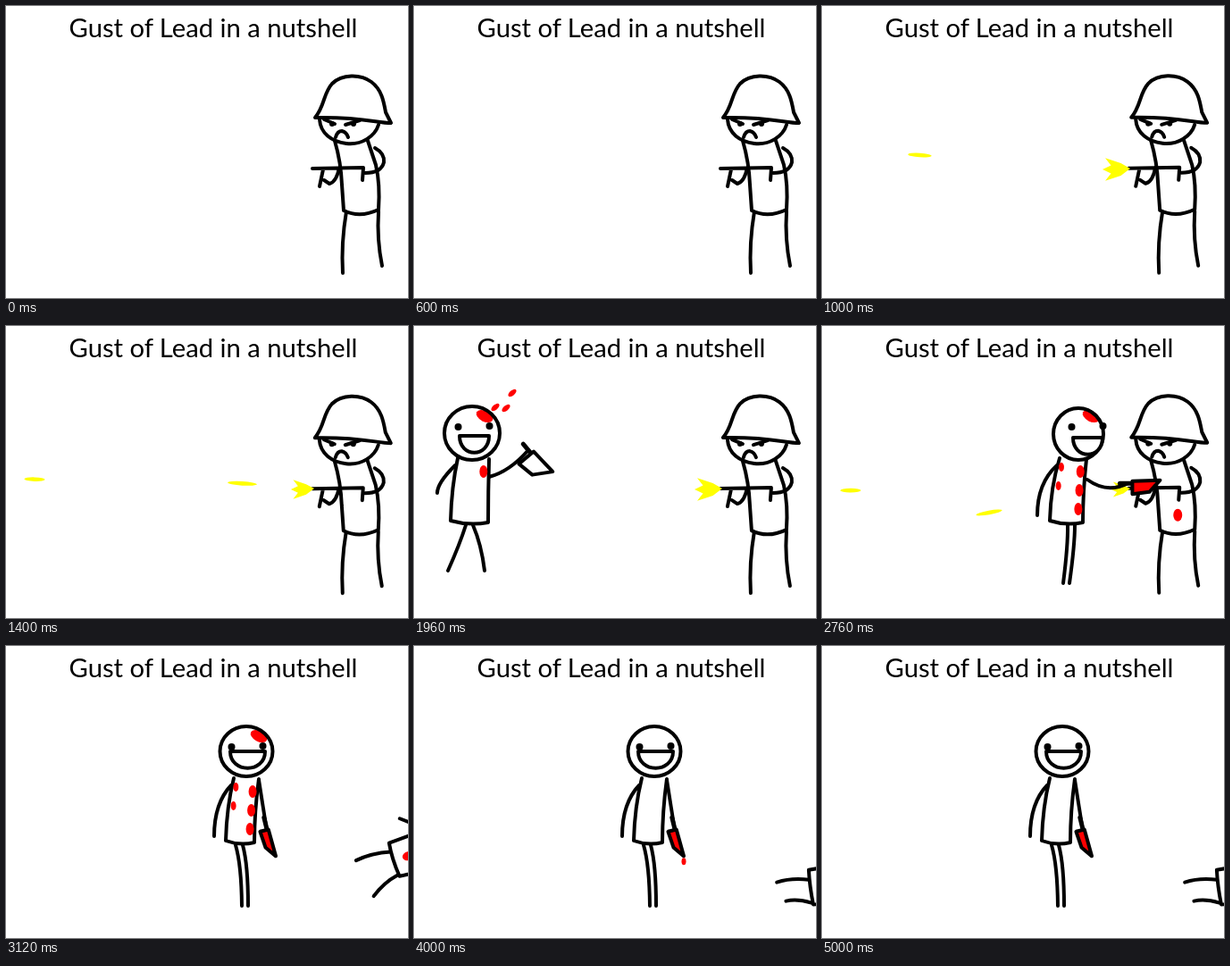
An HTML page with a canvas for the animation above (5040 ms loop, 450 px wide and 327 px high).

```html
<!DOCTYPE html>
<html lang="en">
<head>
<meta charset="utf-8">
<title>Stick soldier</title>
<style>
  html, body { margin: 0; width: 100%; height: 100%; overflow: hidden; background: #fff; }
  canvas { display: block; }
  h1 { position: absolute; left: 14px; right: 0; top: 5px; margin: 0; text-align: center;
       font: 400 29.2px/38px Lato, sans-serif; color: #000; white-space: nowrap; }
</style>
</head>
<body>
<canvas id="stage" width="450" height="327"></canvas>
<h1>Gust of Lead in a nutshell</h1>
<script>
const ctx = document.getElementById('stage').getContext('2d');
const LOOP = 5040, STEP = 40;
const RED = '#f00', YELLOW = '#ff0';
const ENTER = 1680, STAB = 2680, FALL = 2840;

// x values are relative to the head; torso lists its corners' x from top left to top right
const charge = {
  head: [31, 30, 120], mouth: [-14, 19, 123], torso: [-16, -24, 18, 19],
  fist: [-39, 187], shoulder: [19, 169], elbow: [42, 163], hand: [63, 139], knife: [50, 1.8],
  hip: [-3], feet: [-6.5, 274], stride: [17]
};
const reach = {
  head: [28, 29, 121], mouth: [-6, 27, 125], torso: [-21, -32, 5, 9],
  fist: [-46, 212], shoulder: [10, 172], elbow: [32, 188], hand: [42, 153], knife: [0, 1.2],
  hip: [-8], feet: [-13.5, 288], stride: [26]
};
const stand = {
  head: [29.5, 28, 118], mouth: [-18, 21, 118], torso: [-14, -23, 9, 14],
  fist: [-36, 213], shoulder: [14, 150], elbow: [18, 176], hand: [22, 201], knife: [76, .8],
  hip: [-8], feet: [-1.5, 291], stride: [0]
};

const bursts = [
  { from: 760, to: 1720, every: 120, slopes: [-.03, -.06] },
  { from: 1960, to: 2680, every: 80, slopes: [.01, .18] }
];

const ramp = (t, from, to) => Math.max(0, Math.min(1, (t - from) / (to - from)));
const lerp = (a, b, p) => a + (b - a) * p;

function mix(a, b, p) {
  const pose = {};
  for (const part in a) pose[part] = a[part].map((v, i) => lerp(v, b[part][i], p));
  return pose;
}

function line(d, width = 4, fill) {
  const path = new Path2D(d);
  if (fill) { ctx.fillStyle = fill; ctx.fill(path); }
  ctx.lineWidth = width;
  ctx.stroke(path);
}

function oval(x, y, rx, ry, fill, tilt = 0) {
  ctx.beginPath();
  ctx.ellipse(x, y, rx, ry, tilt, 0, Math.PI * 2);
  ctx.fillStyle = fill;
  ctx.fill();
}

function placed(x, y, degrees, draw) {
  ctx.save();
  ctx.translate(x, y);
  ctx.rotate(degrees * Math.PI / 180);
  draw();
  ctx.restore();
}

function drawSoldier(t) {
  const p = ramp(t, FALL, 3200), turn = Math.sqrt(p);
  placed(398 + 43 * p, 232 + 39 * p ** 6, 84 * turn, () => {
    const leg = (hipX, footX, footY) =>
      line(`M${hipX} -2Q${(hipX + footX) / 2 - 4} ${footY / 2} ${footX} ${footY}`);
    leg(lerp(-17, -9, turn), lerp(-21, -10, turn), lerp(67, 34, turn));
    leg(lerp(19, 17, turn), lerp(23, 12, turn) + 30 * Math.sin(Math.PI * p), lerp(59, 26, turn));

    ctx.translate(-398, -232);
    const belly = lerp(238, 230, turn);
    line(`M368 151Q375 175 376 200L378 229Q396 ${belly} 417 228Q419 200 414 178L404 148`, 4, '#fff');
    if (t >= STAB) oval(398, 212, 5, 7, RED);
    line('M351 127C352 143 365 152 381 154C398 156 413 146 417 133', 4, '#fff');
    line('M346 125C357 112 355 98 365 87C376 76 397 76 409 85C421 94 423 108 425 119L431 131C415 131 400 124 346 125Z', 4, '#fff');
    line('M356 127L368 132M380 133L396 128');
    oval(365, 132, 3, 3, '#000');
    oval(389, 132, 3, 3, '#000');
    line('M369 147Q371 140 376 140Q381 141 383 147');
    if (p === 0) {
      line('M343 182L400 181L399 195M355 183L351 202M373 181Q370 197 362 199L356 195');
      line('M413 159Q424 165 423 175Q420 187 402 187');
    } else {
      line('M374 185L355 210');
    }
  });
}

function drawFlash(age) {
  ctx.beginPath();
  for (let i = -3; i <= 3; i++) {
    const spike = Math.abs(i) === 3 ? 11 : i % 2 ? 20 : 29;
    const r = spike * (1 - .17 * age);
    ctx.lineTo(343 - r * Math.cos(i * .23), 183 + r * Math.sin(i * .23));
  }
  ctx.lineTo(345, 182);
  ctx.fillStyle = YELLOW;
  ctx.fill();
}

function drawShots(t) {
  for (const { from, to, every, slopes } of bursts) {
    for (let i = 0; from + i * every <= to; i++) {
      const age = (t - from - i * every) / STEP;
      if (age < 0 || age > 4) continue;
      if (age < 3) drawFlash(age);
      const slope = slopes[i % 2], d = 77.5 * age;
      if (age > 0) oval(342 - d, 181 + d * slope, 18 - 1.6 * age, 2.3, YELLOW, -slope);
    }
  }
}

function drawWounds(t, torso) {
  const [topLeft, bottomLeft, bottomRight, topRight] = torso;
  ctx.globalAlpha = 1 - ramp(t, 3400, 3920);
  if (t >= 1840) oval(14, 101, 10, 6, RED, .5);
  for (let i = 0; i < 3; i++) {
    const y = 163 + 21 * i, down = (y - 150) / 70;
    if (t >= 1840 + 200 * i) oval(lerp(topRight, bottomRight, down) - 6, y, 4.5, 7, RED);
    if (i < 2 && t >= 2480 + 120 * i) oval(lerp(topLeft, bottomLeft, down) + 4, y - 5, 3, 5, RED);
  }
  ctx.globalAlpha = 1;

  const spurt = (t - 1840) / 120;
  if (spurt > 0 && spurt < 1.4)
    for (const [dx, dy] of [[8, -12], [20, -11], [27, -28]])
      oval(18 + dx * spurt, 103 + dy * spurt, 5.5, 2.8, RED, -.7);
}

function drawStick(t) {
  if (t < ENTER) return;
  const pose = t < FALL
    ? mix(charge, reach, ramp(t, 1960, 2360))
    : mix(reach, stand, ramp(t, FALL, 3000));
  const { head: [rx, ry, headY], mouth, torso, fist, shoulder, elbow, hand, knife, hip, feet } = pose;
  const x = Math.min(65 + .445 * (t - 1960), 287) - 18 * ramp(t, FALL, 3000);
  const swing = 3.5 + pose.stride[0] * Math.cos((t - 1960) / 294 * Math.PI * 2) * (1 - ramp(t, 2400, 2520));
  const thrust = Math.sin(Math.PI * ramp(t, 2560, FALL)) ** 2;
  const handX = hand[0] + 22 * thrust, handY = hand[1] + 38 * thrust;

  placed(x, 0, 0, () => {
    for (const side of [-1, 1]) {
      const top = hip[0] + 4 * side, foot = feet[0] + swing * side;
      line(`M${top} 223Q${(top + foot) / 2 + 3} 245 ${foot} ${feet[1]}`);
    }
    const [topLeft, bottomLeft, bottomRight, topRight] = torso;
    line(`M${topLeft - 3} 156Q${fist[0]} 176 ${fist[0]} ${fist[1]}`);
    line(`M${topLeft} 148Q${bottomLeft + 1} 180 ${bottomLeft} 218Q${(bottomLeft + bottomRight) / 2} 224 ${bottomRight} 220Q${bottomRight} 185 ${topRight} 149`, 4, '#fff');

    oval(0, headY, rx, ry, '#fff');
    drawWounds(t, torso);
    ctx.beginPath();
    ctx.ellipse(0, headY, rx, ry, 0, 0, Math.PI * 2);
    ctx.lineWidth = 4;
    ctx.stroke();

    const [left, right, lip] = mouth, face = (left + right) / 2;
    oval(face - 18, 113, 4, 4, '#000');
    oval(face + 17, 112, 4, 4, '#000');
    line(`M${left} ${lip}H${right}C${right} ${lip + 25} ${left} ${lip + 25} ${left} ${lip}Z`, 4, '#fff');

    line(`M${shoulder}Q${elbow} ${handX} ${handY}`);
    placed(handX, handY, knife[0], () => {
      line('M-9 0L5 0', 5);
      const w = knife[1];
      line(`M5 ${-2 * w}L36 ${-3 * w}L24 ${8 * w}L5 ${10 * w}Z`, 4, t >= STAB ? RED : '#fff');
    });
  });
}

function drawDrip(t) {
  const fall = ramp(t, 3960, 4240);
  if (fall > 0 && fall < 1) oval(302, 240 + 58 * fall * fall, 2.5, 4, RED);
  if (fall === 1) {
    ctx.globalAlpha = 1 - ramp(t, 4240, 4480);
    oval(308, 299, 6 + 16 * ramp(t, 4240, 4360), 2.5, RED);
    ctx.globalAlpha = 1;
  }
}

function draw(now) {
  const t = Math.floor(now % LOOP / STEP) * STEP;
  ctx.clearRect(0, 0, 450, 327);
  ctx.lineCap = ctx.lineJoin = 'round';
  // slight hand-drawn wobble until the fall
  const wobble = t < FALL ? .25 * Math.sin(t) : 0;
  placed(wobble, -wobble, 0, () => drawSoldier(t));
  drawShots(t);
  drawStick(t);
  drawDrip(t);
}

const start = performance.now();
function tick() {
  draw(performance.now() - start);
  requestAnimationFrame(tick);
}
tick();
</script>
</body>
</html>
```
